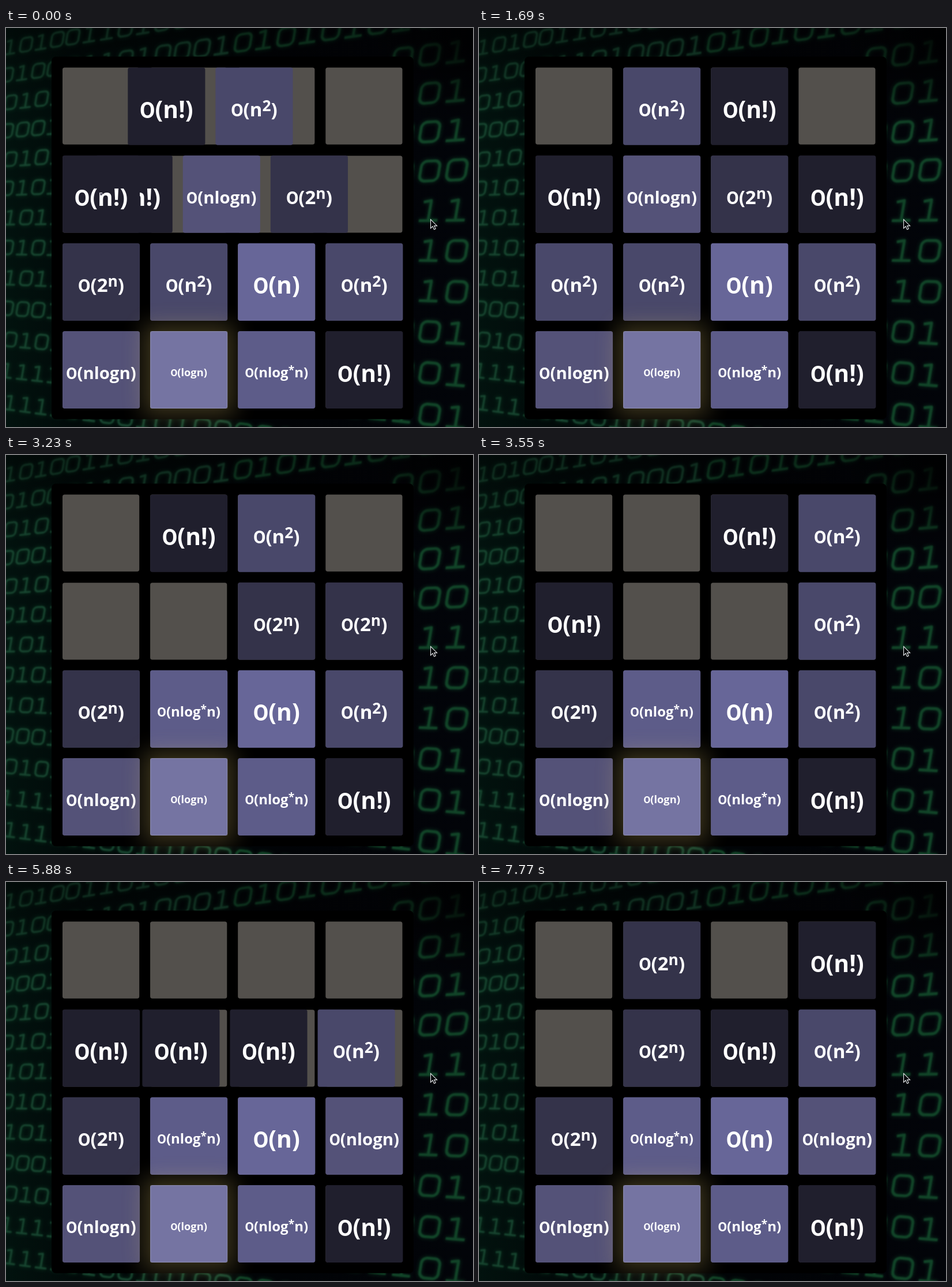
Animation of 810x691 px, one loop 8 s. Source, as an HTML page with a canvas:

```html
<!DOCTYPE html>
<html lang="en">
<head>
<meta charset="utf-8">
<title>Complexity tiles</title>
<style>
  html, body { margin: 0; width: 100%; height: 100%; overflow: hidden; background: #000; }
  canvas { display: block; width: 810px; height: 691px; }
</style>
</head>
<body>
<canvas id="stage" width="810" height="691"></canvas>
<script>
const W = 810, H = 691, LOOP = 8000, STEP = 40;
const LEFT = 98, TOP = 68.6, PITCH = 152.1, SIZE = 134.1;
const ctx = document.getElementById('stage').getContext('2d');

// Tile kinds, worst to best: colour, font size, text after the O, superscript, tail
const KINDS = [null,
  ['#201f2d', 40.8, '(n!)'],
  ['#34334a', 33, '(2', 'n', ')'],
  ['#49486a', 33, '(n', '2', ')'],
  ['#545278', 29.4, '(nlogn)'],
  ['#5d5c89', 24, '(nlog', '*', 'n)'],
  ['#676698', 40.8, '(n)'],
  ['#7574a2', 18.3, '(logn)']
];
const START = [
  0, 0, 1, 3,
  1, 1, 4, 2,
  2, 3, 6, 3,
  4, 7, 5, 1
];
// end time, direction, cell and kind of the new tile, time from slide start to end
const MOVES = [
  [200, 'L', 2, 1, 257.5],
  [1030, 'D', 7, 1, 261],
  [1970, 'R', 0, 1, 261],
  [2790, 'D', 1, 1, 261],
  [3550, 'R', 4, 1, 261],
  [4580, 'D', 5, 1, 261],
  [6120, 'L', 2, 1, 261],
  [7570, 'R', 1, 2, 261]
];
// Cell at place i of line n, counted from the wall the tiles slide to
const LINES = {
  L: (n, i) => n * 4 + i,
  R: (n, i) => n * 4 + 3 - i,
  D: (n, i) => (3 - i) * 4 + n
};

function playMove(grid, [end, dir, spawn, kind, lag]) {
  const next = Array(16).fill(0), tiles = [], merged = [];
  for (let n = 0; n < 4; n++) {
    let place = -1, open = false;
    for (let i = 0; i < 4; i++) {
      const from = LINES[dir](n, i), v = grid[from];
      if (!v) continue;
      let to = LINES[dir](n, Math.max(place, 0));
      if (open && next[to] === v) {
        next[to] = v + 1;
        merged.push({ cell: to, v: v + 1 });
        open = false;
      } else {
        to = LINES[dir](n, ++place);
        next[to] = v;
        open = true;
      }
      tiles.push({ v, from, to, i });
    }
  }
  next[spawn] = kind;
  const order = c => (c % 4) * 4 + (c >> 2);
  tiles.sort((a, b) => order(a.to) - order(b.to) || b.i - a.i);
  return { end, start: end - lag, tiles, merged, spawn, kind, next };
}

let grid = START;
const script = MOVES.map(m => {
  const move = playMove(grid, m);
  grid = move.next;
  return move;
});

function bezier(x1, y1, x2, y2) {
  const at = (a, b, u) => 3 * a * u * (1 - u) ** 2 + 3 * b * u * u * (1 - u) + u ** 3;
  return x => {
    if (x <= 0) return 0;
    if (x >= 1) return 1;
    let lo = 0, hi = 1;
    for (let k = 0; k < 24; k++) {
      const mid = (lo + hi) / 2;
      if (at(x1, x2, mid) < x) lo = mid; else hi = mid;
    }
    return at(y1, y2, lo);
  };
}
const ease = bezier(.25, .1, .25, 1);
const easeInOut = bezier(.42, 0, .58, 1);

const cellX = c => LEFT + (c % 4) * PITCH;
const cellY = c => TOP + (c >> 2) * PITCH;

function box(g, x, y, w, h, r, fill) {
  g.beginPath();
  g.roundRect(x, y, w, h, r);
  g.fillStyle = fill;
  g.fill();
}

function drawLabel([, size, text, sup = '', tail = '']) {
  const body = `700 ${size}px "Open Sans", "Noto Sans", sans-serif`;
  const runs = [
    // Roboto has the narrower capital
    ['O', `700 ${size * .94}px Roboto, sans-serif`, 0],
    [text, body, 0],
    [sup, `700 ${size * .8}px "Open Sans", "Noto Sans", sans-serif`, size * .28],
    [tail, body, 0]
  ];
  const widths = runs.map(([s, font]) => {
    ctx.font = font;
    return ctx.measureText(s).width;
  });
  let x = (SIZE - widths.reduce((a, b) => a + b)) / 2;
  const base = 70.5 + size * .42;
  ctx.fillStyle = '#fff';
  runs.forEach(([s, font, rise], i) => {
    ctx.font = font;
    ctx.fillText(s, x, base - rise);
    x += widths[i];
  });
}

function drawGlow() {
  const far = 2000;
  ctx.save();
  ctx.shadowColor = 'rgba(243,215,116,.238)';
  ctx.shadowBlur = 37.5;
  ctx.shadowOffsetX = far;
  box(ctx, -12.5 - far, -12.5, SIZE + 25, SIZE + 25, 14, '#000');
  ctx.restore();
}

function drawTile(v, x, y, scale = 1, alpha = 1) {
  if (scale <= 0) return;
  const half = SIZE / 2;
  ctx.save();
  ctx.globalAlpha = alpha;
  ctx.translate(x + half, y + half);
  ctx.scale(scale, scale);
  ctx.translate(-half, -half);
  if (v === 7) drawGlow();
  box(ctx, 0, 0, SIZE, SIZE, 3.75, KINDS[v][0]);
  if (v === 7) {
    ctx.strokeStyle = 'rgba(255,255,255,.143)';
    ctx.lineWidth = 1.25;
    ctx.strokeRect(.6, .6, SIZE - 1.2, SIZE - 1.2);
  }
  drawLabel(KINDS[v]);
  ctx.restore();
}

// Backdrop: slanted rows of binary digits, spreading out to the right
const ROWS_LEFT = ['1010', '0100', '0101', '0001', '0101', '0101', '1011',
  '0101', '1011', '0001', '0101', '1111', '1111'];
const ROWS_RIGHT = ['010', '101', '001', '101', '001', '000', '111',
  '110', '110', '001', '001', '101', '010'];

function drawDigit(g, one, x, y, w, tilt) {
  const h = 8 + w * .58, a = w * .35;
  g.save();
  g.translate(x, y);
  g.transform(1, tilt, -.17, 1, 0, 0);
  g.beginPath();
  if (one) {
    g.moveTo(-a * .8, -h * .43);
    g.lineTo(0, -h / 2);
    g.lineTo(0, h / 2);
    g.moveTo(-a, h / 2);
    g.lineTo(a, h / 2);
  } else {
    g.roundRect(-a, -h / 2, a * 2, h, a * .6);
  }
  g.stroke();
  g.restore();
}

function drawBackdrop(g) {
  const base = g.createLinearGradient(0, 0, W, 0);
  base.addColorStop(0, '#02120e');
  base.addColorStop(.14, '#010a09');
  base.addColorStop(.6, '#010306');
  base.addColorStop(1, '#020409');
  g.fillStyle = base;
  g.fillRect(0, 0, W, H);

  g.lineJoin = 'round';
  g.filter = 'blur(.8px)';
  g.shadowColor = 'rgba(16,90,50,.6)';
  g.shadowBlur = 6;
  for (let k = -6; k <= 6; k++) {
    const bend = .35 * k * k;
    const yl = 328 + 52 * k + bend, yr = 316 + 69 * k + bend;
    const tilt = (yr - yl) / 705;
    const put = (bit, x) => {
      g.lineWidth = 3 + x * .0022;
      g.strokeStyle = x < 400 ? '#184530' : '#124428';
      drawDigit(g, bit === '1', x, yl + (x - 35) * tilt, 27 + x * .0255, tilt);
    };
    [...ROWS_LEFT[k + 6]].forEach((b, i) => put(b, 8 + i * 27 - (k & 1) * 6));
    [...ROWS_RIGHT[k + 6]].forEach((b, i) => put(b, 688 + i * 47));
    if (Math.abs(k) > 4) {
      const run = k < 0 ? '011010001010101011' : '010010100001000101';
      let x = 116;
      for (const b of run) {
        if (x > 660) break;
        put(b, x);
        x += 27 + x * .024;
      }
    }
  }
  g.filter = 'none';
  g.shadowBlur = 0;

  const shade = g.createLinearGradient(0, 0, 0, 150);
  shade.addColorStop(0, 'rgba(0,0,0,.4)');
  shade.addColorStop(1, 'rgba(0,0,0,0)');
  g.fillStyle = shade;
  g.fillRect(0, 0, W, 150);
  const corner = g.createRadialGradient(W, 0, 20, W, 0, 190);
  corner.addColorStop(0, 'rgba(0,0,0,.75)');
  corner.addColorStop(1, 'rgba(0,0,0,0)');
  g.fillStyle = corner;
  g.fillRect(600, 0, 210, 200);

  box(g, 79, 49.5, 628, 628, 7.5, '#000');
  for (let c = 0; c < 16; c++)
    box(g, cellX(c), cellY(c) + (c > 3 ? .6 : 0), 133.2, 133.2, 3.75, '#53504c');
}

const back = document.createElement('canvas');
back.width = W;
back.height = H;
drawBackdrop(back.getContext('2d'));

const arrow = new Path2D('M736.5 331.5V347L740 343.5L742.6 349L745.2 347.8L742.7 342.6H747.6Z');
function drawPointer() {
  ctx.fillStyle = '#05070a';
  ctx.strokeStyle = '#e4e6e8';
  ctx.lineWidth = 1.1;
  ctx.fill(arrow);
  ctx.stroke(arrow);
}

function draw(time) {
  const move = script.findLast(m => time >= m.end - 320) || script[0];
  // The picture advances in fixed steps while a move runs
  const t = time < move.end ? move.end - Math.ceil((move.end - time) / STEP) * STEP : time;
  const slide = easeInOut((t - move.start) / 100);
  const grow = (t - move.start - 54) / 200;

  ctx.drawImage(back, 0, 0);
  if (grow >= 1) {
    for (let c = 0; c < 4; c++)
      for (let i = c; i < 16; i += 4)
        if (move.next[i]) drawTile(move.next[i], cellX(i), cellY(i));
  } else {
    const mix = (a, b) => a + (b - a) * slide;
    for (const { v, from, to } of move.tiles)
      drawTile(v, mix(cellX(from), cellX(to)), mix(cellY(from), cellY(to)));
    const fresh = ease(grow);
    drawTile(move.kind, cellX(move.spawn), cellY(move.spawn), fresh, fresh);
    const pop = grow < .5 ? 1.2 * ease(grow * 2) : 1.2 - .2 * ease(grow * 2 - 1);
    for (const { cell, v } of move.merged)
      drawTile(v, cellX(cell), cellY(cell), pop);
  }
  drawPointer();
}

const began = performance.now();
function tick() {
  draw((performance.now() - began) % LOOP);
  requestAnimationFrame(tick);
}
tick();
</script>
</body>
</html>
```
